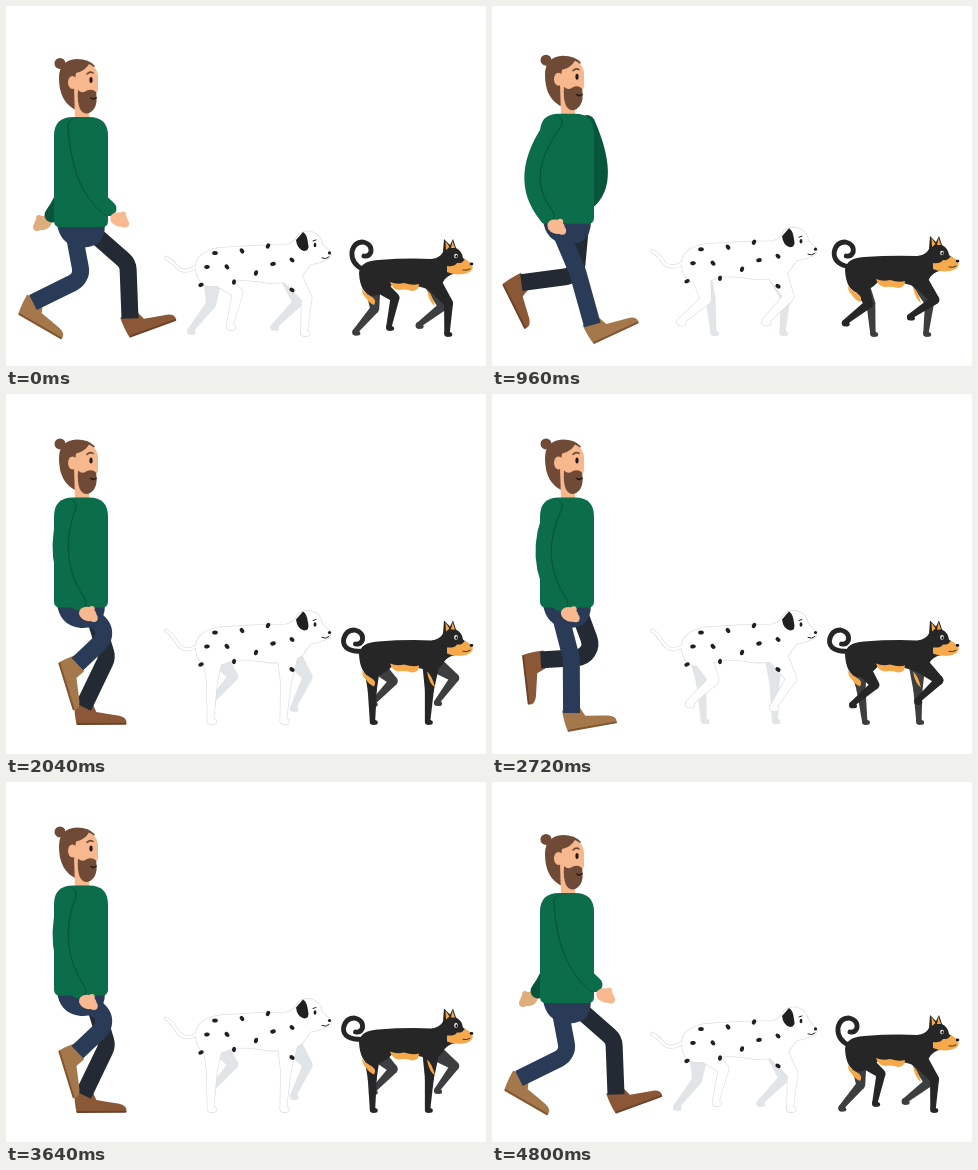
Recreate the animation shown at these times as an HTML page with a canvas. Size 480 by 360 pixels, loop 4.84 s.

```html
<!DOCTYPE html>
<html>
<head>
<meta charset="utf-8">
<style>
html, body { margin: 0; width: 100%; height: 100%; overflow: hidden; background: #fff; }
canvas { display: block; width: 480px; height: 360px; }
</style>
</head>
<body>
<canvas id="stage" width="480" height="360"></canvas>
<script>
const ctx = document.getElementById('stage').getContext('2d');
const LOOP = 4840, CYCLE = 1600, STEP = 40, STANCE = 680;
const { PI, sin, cos, min, max, hypot, atan2, acos } = Math;

function fill(color, d) {
  ctx.fillStyle = color;
  ctx.fill(new Path2D(d));
}
function line(color, width, d) {
  ctx.strokeStyle = color;
  ctx.lineWidth = width;
  ctx.stroke(new Path2D(d));
}
function oval(color, x, y, rx, ry = rx, tilt = 0) {
  ctx.fillStyle = color;
  ctx.beginPath();
  ctx.ellipse(x, y, rx, ry, tilt, 0, 2 * PI);
  ctx.fill();
}
function shifted(x, y, draw, angle = 0) {
  ctx.save();
  ctx.translate(x, y);
  ctx.rotate(angle * PI / 180);
  draw();
  ctx.restore();
}

// Chain of circles [x, y, r] joined by tapering segments
function limb(color, joints) {
  joints.forEach(([x, y, r], i) => {
    oval(color, x, y, r);
    if (!i) return;
    const [px, py, pr] = joints[i - 1];
    const len = hypot(x - px, y - py) || 1;
    const nx = (py - y) / len, ny = (x - px) / len;
    ctx.beginPath();
    ctx.moveTo(px + nx * pr, py + ny * pr);
    ctx.lineTo(x + nx * r, y + ny * r);
    ctx.lineTo(x - nx * r, y - ny * r);
    ctx.lineTo(px - nx * pr, py - ny * pr);
    ctx.fill();
  });
}

// Forward-bending joint between hip and foot for two bones
function knee(hx, hy, fx, fy, upper, lower) {
  const d = min(hypot(fx - hx, fy - hy), upper + lower);
  const bend = acos(min(1, (upper * upper + d * d - lower * lower) / (2 * upper * d)));
  const a = atan2(fy - hy, fx - hx) - bend;
  return [hx + upper * cos(a), hy + upper * sin(a)];
}

// Mean plus two harmonics
const wave = (a, mean, c1, s1, c2, s2) =>
  mean + c1 * cos(a) + s1 * sin(a) + c2 * cos(2 * a) + s2 * sin(2 * a);

function manLeg(a, y, { hip, middle, reach, lag, ground, cloth, leather, sole }) {
  const ax = wave(a, middle, -reach, -lag, 2, -5);
  const ay = min(ground, wave(a, 299, -8, -26, 5.5, -2.5));
  const hy = 228 + y;
  const [kx, ky] = knee(hip, hy, ax, ay, 45, 55);
  shifted(ax, ay, () => {
    fill(leather, 'M-9-4H9L13 5Q25 7 36 9Q44 11 43 17H-7Q-9 8-9-4Z');
    line(sole, 2, 'M-6 17H42');
  }, wave(a, 21.5, 25, 41, -16.5, 3));
  ctx.strokeStyle = cloth;
  ctx.lineWidth = 17;
  ctx.lineCap = 'butt';
  ctx.beginPath();
  ctx.moveTo(hip, hy);
  ctx.arcTo(kx, ky, ax, ay, 14);
  ctx.lineTo(ax, ay);
  ctx.stroke();
  ctx.lineCap = 'round';
}

const nearLeg = { hip: 68, middle: 68, reach: 43, lag: 3, ground: 319, cloth: '#2a3b57', leather: '#a5784b', sole: '#80552f' };
const farLeg = { hip: 88, middle: 76, reach: 46, lag: 9, ground: 313, cloth: '#232a33', leather: '#8a5836', sole: '#6c4329' };

function sleeve(color, sx, sy, ex, ey, cx, cy, shift = 0) {
  const qx = 2 * ex - (sx + cx) / 2, qy = 2 * ey - (sy + cy) / 2;
  line(color, 15, `M${sx + shift} ${sy}Q${qx + shift} ${qy} ${cx + shift} ${cy}`);
}

function hand(color, x, y, side) {
  oval(color, x, y, 9, 7, side * 0.35);
  limb(color, [[x, y, 4], [x + side * 4, y - 5, 3]]);
  limb(color, [[x, y, 6], [x + side * 6, y + 4, 4]]);
}

function head() {
  const hair = '#6e4a37', skin = '#f8b88e';
  oval(hair, 54, 57.5, 5.5);
  fill(hair, 'M53 72Q53 54 71 53Q83 53 89 60L80 70L74 104H70Q53 96 53 72Z');
  fill(skin, 'M70 67Q79 65 83 58Q91 61 92 70V84Q90 92 80 94H76L83 104V114H69L68 80Z');
  fill(hair, 'M72 84Q76 88 80 85Q86 82 90 86Q92 97 88 103Q80 112 74 103Q71 96 72 84Z');
  oval(skin, 66.5, 76.5, 4.5, 6.5);
  oval('#231b19', 85, 74, 1.6, 3);
  line(hair, 1.6, 'M81 68Q84 65 87 67');
  line('#2b1b18', 1.6, 'M85 92Q87 94 90 92');
}

function man(a, bob) {
  const c = cos(a), y = bob * 4;
  const green = '#0b6d49', dark = '#07553a';
  const farX = min(92, 70 - 33 * c), farY = 207 + 10 * c;
  if (c > 0) hand('#dfae7d', farX, farY, -1);
  sleeve(dark, 84 - 14 * c, 120 + y, 84 - 26 * c + 5 * c * c, 172 + y, farX + 9 * max(c, 0), farY - 8 * max(c, 0));
  manLeg(a + PI, y, farLeg);
  manLeg(a, y, nearLeg);
  shifted(0, y, () => {
    fill(nearLeg.cloth, 'M51 218H99Q99 232 91 238Q80 243 72 241Q54 238 51 218Z');
    head();
    fill(green, 'M48 130Q48 111 67 111H83Q102 111 102 130V215Q102 221 96 221H54Q48 221 48 215Z');
  });
  const hx = 86 + 27 * c, hy = 219.5 - 3.5 * c - 2.5 * c * c;
  const arm = [62 + 8 * max(c, 0), 120 + y, 58 + 22 * c, 170 + y, hx - 10, hy - 11];
  sleeve(dark, ...arm, c > 0 ? -1.2 : 1.2);
  sleeve(green, ...arm);
  hand('#f9b990', hx, hy, 1);
}

// The paw slides back on the ground, then swings forward in an arc
function dogLeg(t, y, dog, { hip, front, back, lift, delay }, color, grow = 0) {
  const since = (t - delay + 2 * CYCLE) % CYCLE;
  const u = max(0, (since - STANCE) / (CYCLE - STANCE));
  const travel = since < STANCE ? 1 - since / STANCE : u * u * (3 - 2 * u);
  const px = back + (front - back) * travel, py = dog.ground - lift * sin(PI * u);
  const hy = dog.hipY + y;
  const [kx, ky] = knee(hip, hy, px, py, dog.bone, dog.bone + 2);
  const [r1, r2, r3] = dog.radii.map(r => r + grow);
  limb(color, [[hip, hy, r1], [kx, ky, r2], [px, py - 1, r3]]);
  limb(color, [[px, py, r3], [px + 3, py + 0.5, r3 - 0.4]]);
}
function dogLegs(t, y, dog, color, grow) {
  dog.legs.forEach(leg => dogLeg(t, y, dog, leg, color, grow));
}

const white = { ground: 327, hipY: 265, bone: 33, radii: [11, 5, 3], legs: [
  { hip: 207, front: 225, back: 184, lift: 18, delay: 100 },
  { hip: 282, front: 298, back: 266, lift: 13, delay: 0 }] };
const black = { ground: 328, hipY: 274, bone: 29, radii: [9, 4.5, 2.7], legs: [
  { hip: 366, front: 384, back: 349, lift: 18, delay: 100 },
  { hip: 425, front: 441, back: 411, lift: 20, delay: 0 }] };

function dalmatian(t, bob) {
  const y = bob * 4.5, edge = '#dcdfe1', ink = '#202022';
  const body = 'M190 259Q192 246 212 242Q250 239 280 239Q289 237 292 229Q298 224 306 226Q315 229 316 238L324 246Q327 252 319 254Q310 258 305 258Q300 264 296 270Q285 278 262 277Q240 273 226 275Q208 284 196 278Q189 270 190 259Z';
  const tail = `M193 ${259 + y}Q178 ${270 + y} 170 ${260 + 1.5 * y}Q166 ${255 + 1.8 * y} 160 ${252 + 1.8 * y}`;
  dogLegs(t + CYCLE / 2, y, white, '#e2e5e7');
  line(edge, 4, tail);
  shifted(0, y, () => line(edge, 1.6, body));
  dogLegs(t, y, white, edge, 0.7);
  line('#fff', 2.5, tail);
  dogLegs(t, y, white, '#fff');
  shifted(0, y, () => {
    fill('#fff', body);
    const spots = [[209, 247], [236, 245], [262, 240], [201, 261], [221, 261], [250, 267],
      [267, 258], [286, 254], [228, 276], [195, 279], [286, 284]];
    spots.forEach(([sx, sy], i) => oval(ink, sx, sy, 2.8, 2, i));
    fill(ink, 'M290 234L297 226Q301 228 302 237Q304 245 298 245Q291 243 290 234Z');
    oval(ink, 309, 239, 1.4, 2.2);
    line(ink, 1, 'M307 235L310 234M316 252Q320 254 323 251');
    oval(ink, 323.5, 247, 1.6);
  });
}

function blackDog(t, bob) {
  const y = bob * 3.5, coat = '#262627', tan = '#f6a94b';
  dogLegs(t + CYCLE / 2, y, black, '#3d3e40');
  shifted(bob * 4.5, 0, () =>
    line(coat, 4.8, `M${358 - 4.5 * bob} ${264 + y}Q345 258 346 246Q348 236 357 236Q366 238 365 246Q363 251 358 250`));
  dogLegs(t, y, black, coat);
  shifted(0, y, () => {
    fill(coat, 'M353 267Q354 255 372 254Q400 252 425 253Q434 252 437 246L438 233L444 239L447 233L450 242Q456 245 457 252L466 259Q467 266 455 267Q444 267 439 273Q434 283 424 284Q405 277 386 279Q378 288 366 290Q354 287 353 267Z');
    fill(tan, 'M439.5 235L443.5 241L440 244ZM446.5 235L449 242H445Z');
    fill(tan, 'M441 260Q448 261 451 257Q456 258 459 253L466 258Q469 265 460 267.5Q449 270 441 266Z');
    oval('#fff', 450, 250, 1.8, 2.3);
    oval('#171717', 450.4, 250.3, 1, 1.5);
    oval('#171717', 465.5, 258, 1.8, 1.4);
    line('#171717', 0.8, 'M457 264Q461 265 464 263');
    fill(tan, 'M384 276Q391 279 398 277Q407 280 413 278Q413 285 406 285Q398 283 393 284Q386 283 384 276Z');
    fill(tan, 'M356 283Q360 288 366 291Q371 294 368 299Q363 297 360 292Q356 289 356 283Z');
    fill(tan, 'M421 284Q426 288 429 300Q423 296 421 284Z');
  });
}

function draw(now) {
  const t = Math.floor(now % LOOP / STEP) * STEP % CYCLE;
  const bob = cos((t + 20) / CYCLE * 4 * PI) - 1;
  ctx.fillStyle = '#fff';
  ctx.fillRect(0, 0, 480, 360);
  ctx.lineCap = ctx.lineJoin = 'round';
  man(t / CYCLE * 2 * PI, bob);
  dalmatian(t, bob);
  blackDog(t, bob);
}

const start = performance.now();
function tick() {
  draw(performance.now() - start);
  requestAnimationFrame(tick);
}
tick();
</script>
</body>
</html>
```
